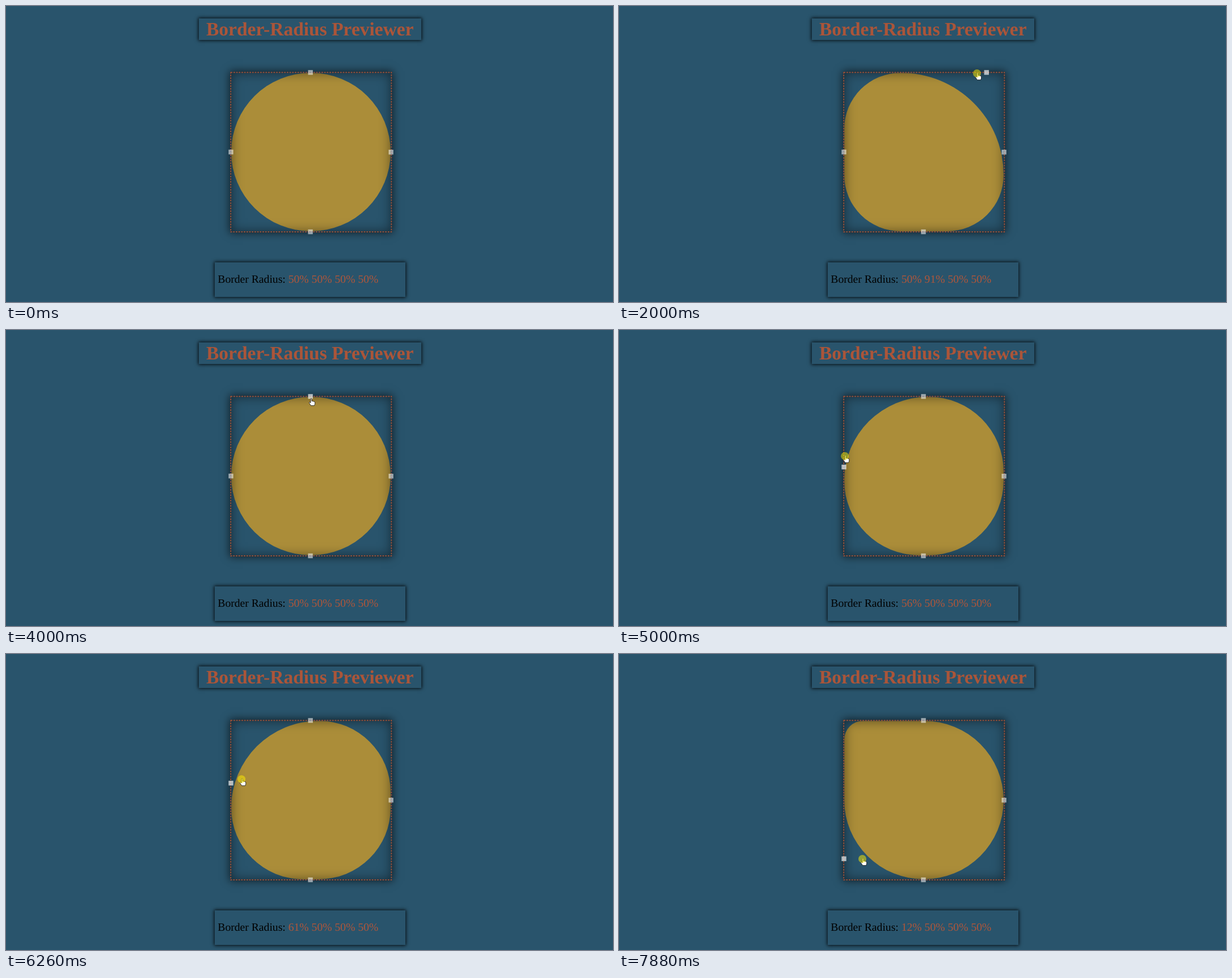
Write an HTML page that moves like this. It is 1070 px wide and 523 px high and loops after 8000 ms.

```html
<!DOCTYPE html>
<html lang="en">
<head>
<meta charset="utf-8">
<title>Border-Radius Previewer</title>
<style>
html, body { margin: 0; width: 100%; height: 100%; overflow: hidden; background: #29546c; }
div, svg { position: absolute; }
.panel { background: #29546c; box-shadow: 0 0 6px 1px #000d; }
#head { left: 340px; top: 22px; width: 392px; height: 38px; }
#info { left: 368px; top: 453px; width: 336px; height: 61px; }
#frame { left: 396px; top: 117px; width: 284px; height: 282px; background: #29546c; box-shadow: 0 0 14px 2px rgba(0,0,0,.62); }
#shape { left: 397px; top: 118px; width: 281px; height: 280px; background: #ab8d39; }
#shade { left: 397px; top: 118px; width: 282px; height: 281px; box-shadow: inset 0 0 20px rgba(0,0,0,.5); }
svg { left: 0; top: 0; }
text { font-family: "Liberation Serif", "Times New Roman", serif; text-rendering: geometricPrecision; }
</style>
</head>
<body>
<div id="head" class="panel"></div>
<div id="info" class="panel"></div>
<div id="frame"></div>
<div id="shape"></div>
<div id="shade"></div>
<svg width="1070" height="523" viewBox="0 0 1070 523">
  <text x="535.8" y="52.3" font-size="33.5" font-weight="bold" text-anchor="middle" fill="#ab5539">Border-Radius Previewer</text>
  <text x="373.3" y="489.3" font-size="19.65">Border Radius: <tspan id="values" fill="#b0563a"></tspan></text>
  <g fill="none">
    <rect x="396.2" y="117.3" width="283.2" height="281.9" stroke="#1c2f3c" stroke-opacity=".75" stroke-width="2.4"/>
    <rect x="396.2" y="117.3" width="283.2" height="281.9" stroke="#a0553c" stroke-width="1.7" stroke-dasharray="2.9 1.8"/>
  </g>
  <g id="grips"></g>
  <g id="cursor" stroke="#111" stroke-width=".8" stroke-linejoin="round" fill="#fff">
    <path id="arrow" d="M0 0V11L2.5 8.7L4.2 12.6L6 11.8L4.3 8H7.8Z"/>
    <path id="hand" d="M0 -.4Q1 -2 2 -.4V3.8Q3 3 3.9 4Q5 3.4 5.8 4.5Q7.4 4.2 7.6 5.8V8.3Q7.4 9.8 6.5 11.6H.4Q-.4 9.8 -2 7.8Q-3.4 5.6 -2 5.4Q-1 5.4 0 6.8Z"/>
    <circle id="spot" r="7" stroke="none" fill="rgb(255,240,0)" fill-opacity=".5"/>
  </g>
</svg>
<script>
const LOOP = 8000, LAG = 50, ENTER = 100;
const $ = id => document.getElementById(id);

const entry = { x: 930, y: 490 };
const moves = [];
const move = (from, to, x, y) => moves.push({ from, to, x, y });

// approach the top grip, drag it right, back and a little left
move(ENTER, 850, 541.5, 117);
move(1610, 1900, 655, 119);
move(1900, 2240, 542, 119);
move(2450, 2575, 535, 121);
move(2840, 3010, 526, 121);
move(3390, 3585, 537, 122);
// cross to the left grip, drag it up, down, up and down
move(4000, 4790, 397, 258);
move(4860, 5360, 403, 76);
move(5409, 5885, 431, 315);
move(5885, 6280, 415, 220.5);
move(6280, 6450, 414, 200);
move(6520, 6830, 424, 324);
move(7640, 7840, 429, 362);

const drags = { top: { from: 1360, to: 3640 }, left: { from: 4860, to: LOOP } };

const clamp = (v, lo, hi) => Math.max(lo, Math.min(hi, v));
const ease = u => u * u * (3 - 2 * u);

function pointer(t) {
  let { x, y } = entry;
  for (const m of moves) {
    const k = ease(clamp((t - m.from) / (m.to - m.from), 0, 1));
    x += (m.x - x) * k;
    y += (m.y - y) * k;
  }
  return { x, y };
}

// a grip trails the pointer and stays where it is dropped
function slide(t, drag, axis, rest, lo, hi) {
  if (t < drag.from) return rest;
  return clamp(pointer(Math.min(t, drag.to) - LAG)[axis], lo, hi);
}

function make(tag, parent, attrs = {}) {
  const el = document.createElementNS("http://www.w3.org/2000/svg", tag);
  for (const k in attrs) el.setAttribute(k, attrs[k]);
  return parent.appendChild(el);
}

// top, right, bottom, left
const grips = ["M-2.5 0H2.5", "M0 -2.5V2.5", "M-2.5 0H2.5", "M0 -2.5V2.5"].map(d => {
  const g = make("g", $("grips"));
  const box = make("rect", g, { x: -4.2, y: -4.2, width: 8.4, height: 8.4, fill: "#fff" });
  const mark = make("path", g, { d, stroke: "#5d7484", "stroke-opacity": .55 });
  return { g, box, mark };
});

const show = (el, on) => el.setAttribute("visibility", on ? "visible" : "hidden");
const place = (el, x, y) => el.setAttribute("transform", `translate(${x} ${y})`);

function draw(t) {
  const { x, y } = pointer(t);
  const topX = slide(t, drags.top, "x", 537, 400, 674);
  const leftY = slide(t, drags.left, "y", 258, 121, 395);

  const tl = Math.round((395 - leftY) / 2.74), tr = Math.round((topX - 400) / 2.74);
  const radius = `${tl}% ${tr}% 50% 50%`;
  $("shape").style.borderRadius = radius;
  $("values").textContent = radius;

  const held = ({ from, to }) => t >= from && t < to;
  const pressed = [held(drags.top), false, false, held(drags.left)];
  const spots = [[topX - .3, 117.4], [678.7, 258.2], [536.6, 399], [396.5, leftY]];
  const lit = spots.map(([gx, gy], i) => pressed[i] || Math.hypot(x - gx, y - gy) < 6);
  grips.forEach(({ g, box, mark }, i) => {
    place(g, ...spots[i]);
    box.setAttribute("fill-opacity", lit[i] ? .65 : .55);
    show(mark, !lit[i]);
  });

  const inside = t >= ENTER, over = lit.includes(true);
  place($("cursor"), x, y);
  show($("arrow"), inside && !over);
  show($("hand"), inside && over);
  show($("spot"), pressed.includes(true));
}

const start = performance.now();
function tick() {
  draw((performance.now() - start) % LOOP);
  requestAnimationFrame(tick);
}
tick();
</script>
</body>
</html>
```
